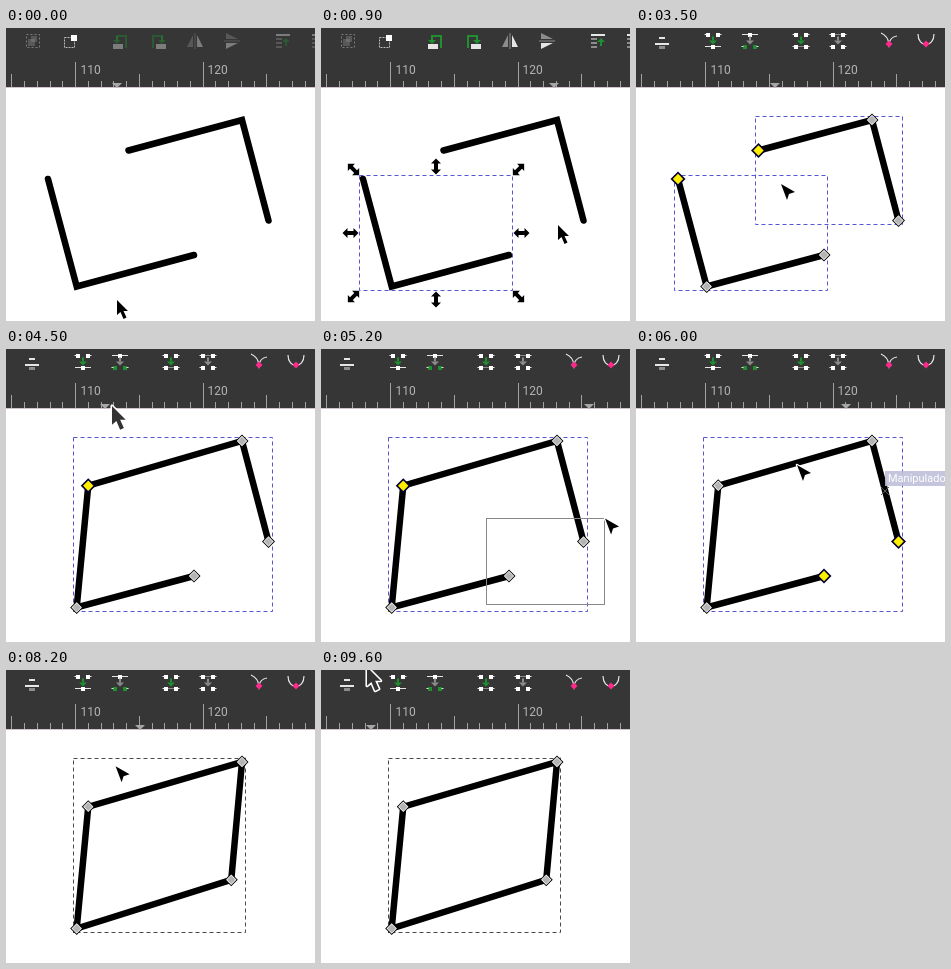
An HTML page with a canvas that plays this animation: 309x293 px, repeating every 9700 ms.

```html
<!DOCTYPE html>
<html>
<head>
<meta charset="utf-8">
<style>
html, body { margin: 0; width: 100%; height: 100%; overflow: hidden; background: #fff; }
canvas { display: block; }
</style>
</head>
<body>
<canvas id="stage" width="309" height="293"></canvas>
<script>
const g = document.getElementById('stage').getContext('2d');
const LOOP = 9700, STEP = 100, BAR = 59;
const LIGHT = '#e6e6e6', GREEN = '#1f8f2f', GREY = '#8c8c8c', PINK = '#ff2a8c', BLUE = '#5656d6';

// Pointer stops: time, x, y; each move slows down towards its stop
const stops = [
  [0, 111, 272], [400, 130, 243], [900, 237, 197], [1500, 252, 150], [2000, 252, 150],
  [2400, 196, 167], [3000, 8, 98], [3500, 144, 155], [4000, 73, 15], [4400, 73, 15],
  [4500, 106, 57], [4800, 165, 255], [5300, 288, 165], [5900, 210, 125], [6000, 160, 115],
  [6300, 50, 50], [6700, 72, 15], [7300, 72, 15], [7600, 240, 110], [7900, 200, 169],
  [8700, 50, 48], [9300, 31, 0], [9600, 46, -3]
];

// The two open paths A-B-C and D-E-F, and the nodes made by joining their ends
const A = [42, 151], B = [70.7, 258.5], C = [188, 227];
const D = [122.5, 122.5], E = [236, 92], F = [262.5, 192.5];
const mid = (p, q) => p.map((v, i) => (v + q[i]) / 2);
const J = mid(A, D), K = mid(C, F);

function pointer(t) {
  const i = stops.findIndex(s => s[0] >= t);
  if (i < 1) return stops.at(i).slice(1);
  const [t0, x0, y0] = stops[i - 1], [t1, x1, y1] = stops[i];
  const f = 1 - (1 - (t - t0) / (t1 - t0)) ** 2;
  return [x0 + (x1 - x0) * f, y0 + (y1 - y0) * f];
}

function rect(x, y, w, h, color) {
  g.fillStyle = color;
  g.fillRect(x, y, w, h);
}

function trace(pts, close) {
  g.beginPath();
  pts.forEach(([x, y]) => g.lineTo(x, y));
  if (close) g.closePath();
}

function poly(pts, color) {
  trace(pts, true);
  g.fillStyle = color;
  g.fill();
}

function line(pts, color, width = 1, close = false) {
  trace(pts, close);
  g.strokeStyle = color;
  g.lineWidth = width;
  g.stroke();
}

function diamond(x, y, r, color) {
  poly([[x - r, y], [x, y - r], [x + r, y], [x, y + r]], color);
}

function label(text, x, y, size, color) {
  g.font = `${size}px Roboto, sans-serif`;
  g.fillStyle = color;
  g.fillText(text, x, y);
}

function frameBox([x0, y0, x1, y1], color, dash = []) {
  g.setLineDash(dash);
  g.strokeStyle = color;
  g.lineWidth = 1;
  g.strokeRect(x0 + .5, y0 + .5, x1 - x0, y1 - y0);
  g.setLineDash([]);
}

function bounds(...pts) {
  const xs = pts.map(p => p[0]), ys = pts.map(p => p[1]), pad = 3.5;
  return [Math.min(...xs) - pad, Math.min(...ys) - pad,
          Math.max(...xs) + pad, Math.max(...ys) + pad].map(Math.floor);
}

function at(x, y, angle, draw, flip = 1) {
  g.save();
  g.translate(x, y);
  g.rotate(angle);
  g.scale(flip, 1);
  draw();
  g.restore();
}

function arrow(x, y, angle, color) {
  at(x, y, angle, () => {
    rect(-1, -4, 2, 4, color);
    poly([[-4, 0], [4, 0], [0, 4]], color);
  });
}

function rotateIcon(x, flip) {
  at(x, 13, 0, () => {
    rect(-8, 3, 10, 5, LIGHT);
    line([[-4, 0], [-4, -5], [5, -5], [5, 7]], GREEN, 2);
    arrow(-4, -1, 0, GREEN);
  }, flip);
}

function flipIcon(x, angle) {
  at(x, 13, angle, () => {
    poly([[-2, -6], [-2, 6], [-8, 6]], GREY);
    poly([[2, -6], [2, 6], [8, 6]], LIGHT);
    line([[0, -8], [0, 8]], GREY);
  });
}

function raiseIcon(x) {
  for (let i = 0; i < 4; i++) rect(x, 6 + 4 * i, i ? 6 : 14, 2, i ? GREY : LIGHT);
  arrow(x + 10, 14, Math.PI, GREEN);
}

function selectIcons(active) {
  g.globalAlpha = .4;
  frameBox([20, 6, 33, 19], LIGHT, [2, 2]);
  rect(22, 11, 7, 7, GREY);
  rect(25, 8, 6, 6, GREY);
  g.globalAlpha = 1;
  frameBox([58, 9, 68, 19], '#bbb', [2, 1]);
  rect(65, 7, 6, 6, '#fff');
  g.globalAlpha = active ? 1 : .4;
  rotateIcon(115, 1);
  rotateIcon(152, -1);
  flipIcon(189, 0);
  flipIcon(226, Math.PI / 2);
  raiseIcon(270);
  raiseIcon(306);
  g.globalAlpha = 1;
}

// A pair of node squares, either linked by a line or with loose outer ends
function pair(x, y, linked, color = '#fff') {
  if (linked) rect(x - 5, y + 1, 10, 1, GREY);
  for (const s of [-1, 1]) {
    rect(x + 5 * s - 2, y, 4, 4, color);
    rect(x + 7.5 * s - 1, y + 1, 2, 1, LIGHT);
  }
}

function single(x, y) {
  rect(x - 8, y + 1, 16, 1, LIGHT);
  rect(x - 2, y, 4, 4, '#fff');
}

function nodeIcons(hover) {
  if (hover) {
    g.beginPath();
    g.roundRect(59.5, -4.5, 35, 34, 4);
    g.fillStyle = '#2c2c2c';
    g.fill();
    g.strokeStyle = '#1d1d1d';
    g.lineWidth = 1;
    g.stroke();
  }
  rect(23, 9, 6, 2, LIGHT);
  rect(19, 15, 14, 2, LIGHT);
  rect(23, 18, 6, 3, GREY);

  pair(77, 5, false);
  single(77, 17);
  single(114, 5);
  pair(114, 17, false, GREEN);
  pair(165, 5, false);
  pair(165, 17, true);
  pair(202, 5, true);
  pair(202, 17, false);
  [77, 114, 165, 202].forEach((x, i) => arrow(x, 12.5, 0, i % 2 ? GREY : GREEN));

  g.strokeStyle = LIGHT;
  g.lineWidth = 1.2;
  g.beginPath();
  g.moveTo(245, 5);
  g.quadraticCurveTo(252, 8, 253, 16);
  g.quadraticCurveTo(254, 9, 261, 8);
  g.moveTo(282, 6);
  g.bezierCurveTo(282, 20, 298, 20, 298, 6);
  g.stroke();
  for (const x of [253, 290]) diamond(x, 16, 3.5, PINK);
}

function ruler(marker) {
  for (let i = -5; i < 19; i++) {
    const x = Math.floor(69.5 + i * 12.75);
    const top = i % 10 === 0 ? 34 : i % 5 === 0 ? 46 : 53;
    rect(x, top, 1, BAR - top, '#a2a2a2');
  }
  label('110', 74.5, 46, 12, '#b4b4b4');
  label('120', 201.5, 46, 12, '#b4b4b4');
  poly([[marker - 5, 55], [marker + 5, 55], [marker, 60]], '#a6a6a6');
}

function node([x, y], selected) {
  diamond(x, y, selected ? 7.5 : 6.5, selected ? '#000030' : '#000');
  diamond(x, y, 5.2, selected ? '#ffee00' : '#fff');
  if (!selected) diamond(x, y, 4.2, '#b4b4b4');
}

function handles([x0, y0, x1, y1]) {
  const half = [[-8, 0], [-3, -5], [-3, -2], [3, -2], [3, -5], [8, 0]];
  const shape = half.concat(half.map(([x, y]) => [-x, -y]));
  for (const sx of [-1, 0, 1]) for (const sy of [-1, 0, 1]) {
    if (!sx && !sy) continue;
    const gap = sx && sy ? 6 : 9;
    const x = (x0 + x1 + 1 + sx * (x1 - x0)) / 2 + sx * gap;
    const y = (y0 + y1 + 1 + sy * (y1 - y0)) / 2 + sy * gap;
    const angle = sx ? sx * sy * Math.PI / 4 : Math.PI / 2;
    at(x, y, angle, () => poly(shape, '#000'));
  }
}

function drawPointer(x, y, nodeTool) {
  const onBar = nodeTool && y < BAR;
  const shape = nodeTool && !onBar
    ? [[1, 1], [15, 9], [9, 11], [7, 17]]
    : [[0, 0], [0, 15], [3.5, 12], [6.5, 19], [9.5, 17.5], [6.5, 11], [11, 11]];
  at(x, y, 0, () => {
    if (onBar) g.scale(1.25, 1.25);
    g.lineJoin = 'round';
    line(shape, '#fff', 2.5, true);
    poly(shape, onBar ? '#333' : '#000');
  });
}

function render(t) {
  const within = (a, b) => t >= a && t < b;
  const nodeTool = t >= 2000, joined = t >= 4200, closed = t >= 7200;
  const [x, y] = pointer(t);

  rect(0, 0, 309, 293, '#fff');
  rect(0, 0, 309, BAR, '#363636');
  rect(0, BAR, 309, 1, '#d2c4ce');
  if (nodeTool) nodeIcons(within(4000, 4500) || within(6600, 7400));
  else selectIcons(t >= 400);

  // The ruler mark trails by one step and stays put while the pointer is on the toolbar
  let back = t - STEP;
  while (pointer(back)[1] < 45) back -= STEP;
  ruler(Math.round(pointer(back)[0]));

  const paths = closed ? [[J, E, K, B]] : joined ? [[C, B, J, E, F]] : [[A, B, C], [D, E, F]];
  g.lineCap = 'round';
  paths.forEach(p => line(p, '#000', 6.5, closed));
  g.lineCap = 'butt';

  const picked = joined ? paths : paths.filter((p, i) => t >= [400, 1400][i]);
  picked.forEach(p => frameBox(bounds(...p), closed ? '#4a4a4a' : BLUE, [4, 3]));
  if (picked.length && !nodeTool) handles(bounds(...picked.flat()));

  if (nodeTool) {
    const yellow = [];
    if (within(3500, 5300)) yellow.push(A, D, J);
    if (within(5300, 8100)) yellow.push(C, F, K);
    paths.flat().forEach(p => node(p, yellow.includes(p)));
  }

  for (const drag of [3000, 4800]) {
    if (within(drag, drag + 500))
      frameBox([...pointer(drag), x, y].map(Math.round), '#888');
  }

  if (within(5700, 6200)) {
    for (const s of [-4, 4]) line([[249 - s, 138], [249 + s, 146]], '#555');
    rect(249, 122, 60, 15, 'rgba(190,190,218,.88)');
    label('Manipulador', 252, 133, 11, '#fff');
  }
  drawPointer(x, y, nodeTool);
  g.lineJoin = 'miter';
}

const start = performance.now();
function tick() {
  const t = (performance.now() - start) % LOOP;
  render(Math.floor(t / STEP) * STEP);
  requestAnimationFrame(tick);
}
tick();
</script>
</body>
</html>
```
